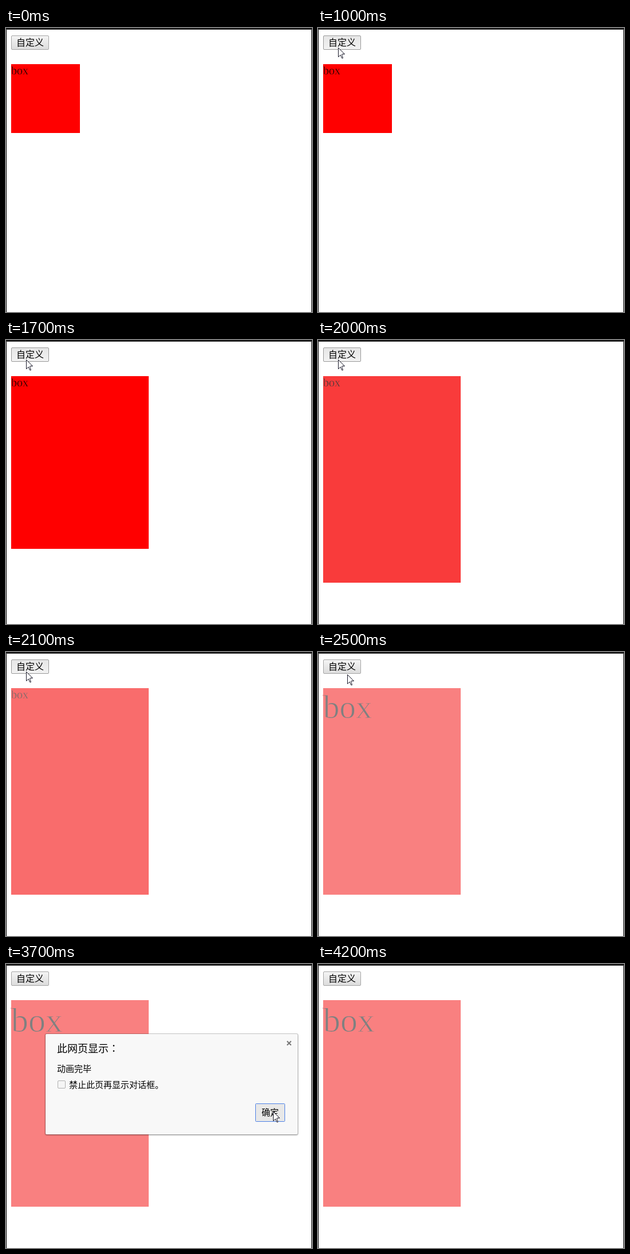
Animation of 534x495 px, one loop 4.6 s. Source, as an HTML page:

```html
<!DOCTYPE html>
<html lang="zh-CN">
<head>
<meta charset="utf-8">
<style>
html, body { margin: 0; width: 100%; height: 100%; overflow: hidden; background: #fff; }
svg { display: block; }
text { font: 15px "Noto Sans CJK SC", "Noto Sans CJK", sans-serif; }
#label { font-family: "Liberation Serif", "Times New Roman", serif; }
</style>
</head>
<body>
<svg width="534" height="495" viewBox="0 0 534 495">
  <defs>
    <linearGradient id="idle" x2="0" y2="1"><stop stop-color="#f5f5f5"/><stop offset="1" stop-color="#dcdcdc"/></linearGradient>
    <linearGradient id="hover" x2="0" y2="1"><stop stop-color="#e6e6e6"/><stop offset="1" stop-color="#f2f2f2"/></linearGradient>
    <filter id="shadow" x="-5%" y="-5%" width="110%" height="112%">
      <feDropShadow dx="0" dy="1" stdDeviation="1" flood-opacity=".35"/>
    </filter>
  </defs>

  <!-- page frame -->
  <path d="M.5 495V0M533.5 495V0" stroke="#000"/>
  <rect width="534" height="3" fill="#333"/>
  <rect width="534" height="1"/>

  <rect id="button" x="9.5" y="13.5" width="65" height="24" rx="1.5" stroke="#a5a5a5"/>
  <text x="18" y="31" style="font-size:16px">自定义</text>

  <rect id="box" x="9" y="63"/>
  <text id="label" x="9">box</text>

  <g id="dialog">
    <rect x="69" y="122" width="440" height="175" rx="2" fill="#f8f8f8" stroke="#000" stroke-opacity=".2" stroke-width="2" paint-order="stroke" filter="url(#shadow)"/>
    <text x="89" y="154" style="font-size:18px">此网页显示<tspan lang="zh-TW">：</tspan></text>
    <text x="89" y="187.5">动画完毕</text>
    <rect x="90.5" y="203.5" width="13" height="13" rx="1.5" fill="#f5f5f5" stroke="#b0b0b0"/>
    <text x="110" y="215.5">禁止此页再显示对话框。</text>
    <path d="M490.5 134.5l7 7m0-7l-7 7" stroke="#777" stroke-width="2"/>
    <rect id="ok" x="435.5" y="243.5" width="51" height="31" rx="1" stroke="#4d81e6"/>
    <text x="446" y="263.5">确定</text>
  </g>

  <path id="cursor" d="M.5 .5V16.5L4.2 13 6.6 18.5H8.5L6.5 12 7 11.5H11.5Z" fill="#fff" stroke="#1a1a2a"/>
</svg>
<script>
const LOOP = 4600, TICK = 100, START = 1079, STAGE = 372;
const $ = id => document.getElementById(id);
const set = (id, attrs) => {
  for (const name in attrs) $(id).setAttribute(name, attrs[name]);
};
const progress = (t, start, span) => Math.min(1, Math.max(0, (t - start) / span));
const mix = (from, to, p) => from + (to - from) * p;

// The four properties are tweened one after another.
function tween(t, stage, from, to) {
  const p = progress(t, START + stage * STAGE, STAGE);
  return mix(from, to, 0.5 - Math.cos(p * Math.PI) / 2);
}

const easeIn = p => p ** 1.6;
const easeOut = p => 1 - (1 - p) ** 1.6;
const linear = p => p;

// Pointer moves: start, duration, destination, easing; it rests in between.
const entry = [-6, 50];
const moves = [
  [600, 400, [35, 34], easeOut],
  [2200, 100, [51, 39], linear],
  [2700, 300, [300, 90], easeIn],
  [3000, 400, [486, 236], easeOut],
  [3400, 200, [466, 257], linear],
  [3900, 300, [546, 282], linear]
];

function pointerAt(t) {
  if (t >= 100 && t < 200) return [84, 75];
  let at = entry;
  for (const [start, span, to, ease] of moves) {
    const p = ease(progress(t, start, span));
    at = at.map((v, i) => mix(v, to[i], p));
  }
  return at.map(Math.round);
}

function draw(t) {
  const fade = 1 - tween(t, 2, 1, 0.5);
  const size = tween(t, 3, 20, 60);
  const tint = Math.round(255 * fade);
  const red = Math.round(255 - 6 * Math.min(1, fade * 10));
  const fill = `rgb(${red},${tint},${tint})`;
  set("box", {
    width: Math.round(tween(t, 0, 120, 240)),
    height: Math.round(tween(t, 1, 120, 360)),
    fill
  });
  // A stroke in the box colour thins the letters.
  set("label", {
    y: 63 + 0.915 * size,
    fill: `rgb(${tint},${tint},${tint})`,
    stroke: fill,
    "stroke-width": 0.02 * size
  });
  $("label").style.fontSize = size + "px";

  const over = t >= 800 && t < 2300;
  set("button", { fill: `url(#${over ? "hover" : "idle"})`, stroke: over ? "#999" : "#a5a5a5" });
  set("dialog", { visibility: t >= 2600 && t < 3900 ? "visible" : "hidden" });
  set("ok", { fill: t >= 3700 ? "#e8e8e8" : t >= 3600 ? "#f2f2f2" : "#fafafa" });

  const shown = t >= 100 && t < 200 || t >= 600 && t < 4200;
  set("cursor", {
    visibility: shown ? "visible" : "hidden",
    transform: `translate(${pointerAt(t)})`
  });
}

const begin = performance.now();
function loop() {
  const t = (performance.now() - begin) % LOOP;
  draw(Math.floor(t / TICK) * TICK);
  requestAnimationFrame(loop);
}
loop();
</script>
</body>
</html>
```
